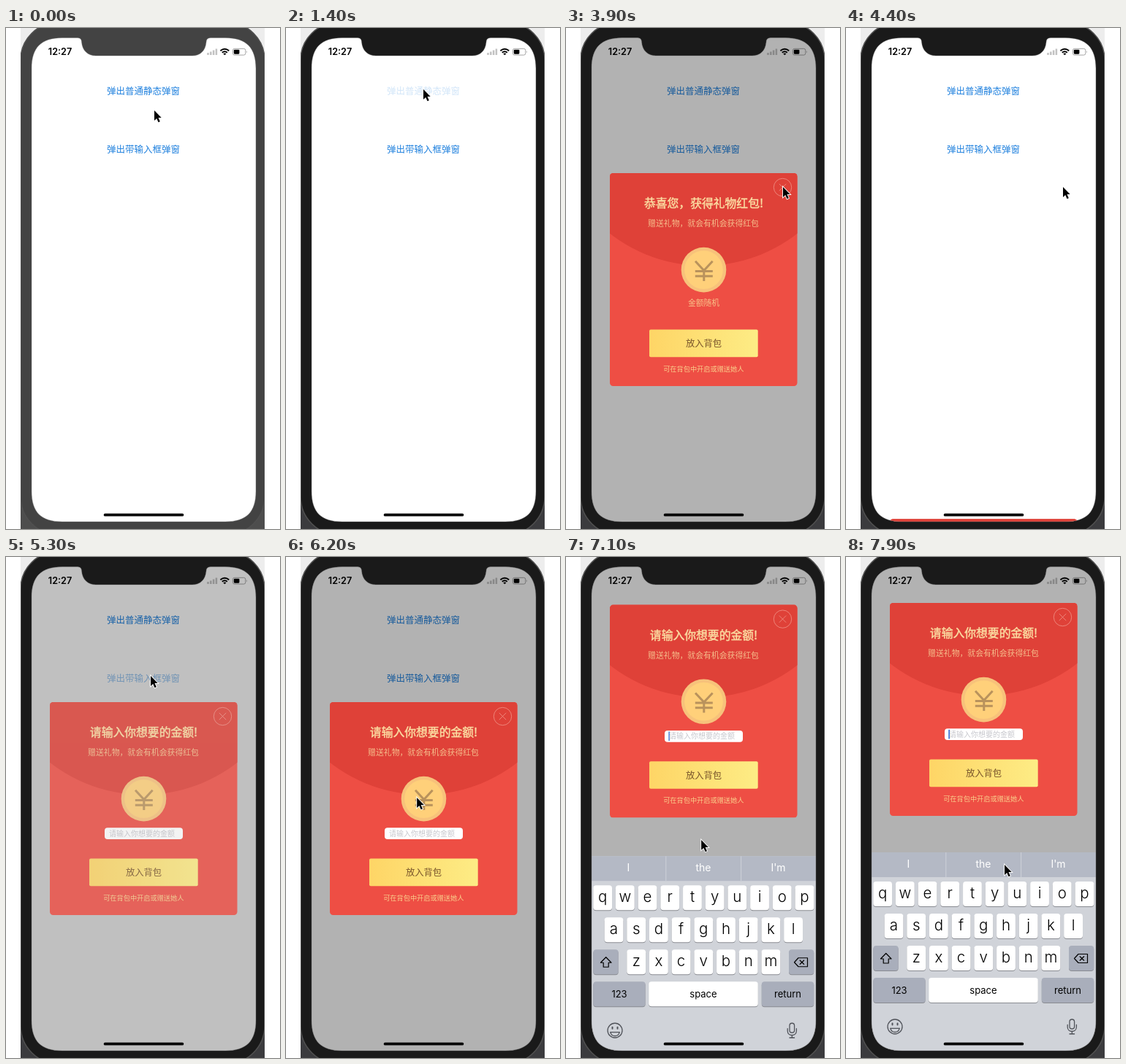
An HTML page that plays this animation: 375 px wide and 687 px high, repeating every 8 s.

```html
<!DOCTYPE html>
<html lang="zh-CN">
<head>
<meta charset="utf-8">
<title>弹窗</title>
<style>
  html, body { margin: 0; width: 100%; height: 100%; overflow: hidden; background: #fff; }
  svg { display: block; width: 375px; height: 687px; }
  text { font-family: "Noto Sans CJK SC", "Noto Sans CJK", "Noto Sans CJK JP", sans-serif; text-anchor: middle; }
  .latin { font-family: Inter, Roboto, sans-serif; }
</style>
</head>
<body>
<svg viewBox="0 0 375 687" xmlns="http://www.w3.org/2000/svg">
  <defs>
    <path id="outline" d="M77 13.5H98Q103.5 13.5 103.5 19.5C104.5 31 112 38 123 38H255C266 38 273 31 274 19.5Q274 13.5 280 13.5H300C329 13.5 342 27 342 55.5V635C342 664 329 677 300 677H77C48 677 35 664 35 635V55.5C35 27 48 13.5 77 13.5Z"/>
    <clipPath id="display"><use href="#outline"/></clipPath>
    <clipPath id="stage"><path d="M20 0H354V687H20Z"/></clipPath>
    <clipPath id="card"><rect x="60" y="199" width="256.5" height="292" rx="4.5"/></clipPath>
    <linearGradient id="gold"><stop stop-color="#fed566"/><stop offset="1" stop-color="#fdec85"/></linearGradient>
  </defs>

  <g clip-path="url(#stage)">
    <path d="M20 0H354V60H20Z" fill="#ededed"/>
    <path id="desk" d="M20 630H354V687H20Z"/>
    <rect id="bezel" x="20" y="-8" width="334" height="703" rx="52" stroke="#505050" stroke-width="1.6"/>
  </g>

  <g clip-path="url(#display)">
    <path d="M35 13H342V677H35Z" fill="#fff"/>
    <text class="latin" x="74" y="37" font-size="12.6" font-weight="600">12:27</text>
    <path d="M276.5 37V34M280.3 37V32.5M284.1 37V30.5M287.9 37V28.5" stroke="#c2c2c2" stroke-width="2.5"/>
    <path d="M293.4 31.2Q299.3 26.2 305.2 31.2M295.8 33.7Q299.3 30.8 302.8 33.7" fill="none" stroke="#000" stroke-width="2"/>
    <path d="M297.2 35.2Q299.3 33.6 301.4 35.2L299.3 37.3Z"/>
    <rect x="310.4" y="28.3" width="17.4" height="8.8" rx="2.4" fill="none" stroke="#9a9a9a" stroke-width=".9"/>
    <rect x="311.8" y="29.7" width="7.6" height="6" rx="1.1"/>
    <path d="M329 31.2Q330.6 32.7 329 34.2Z" fill="#9a9a9a"/>
    <g font-size="12.5" fill="#1f80de">
      <text id="plainButton" x="188" y="91">弹出普通静态弹窗</text>
      <text id="inputButton" x="188" y="171">弹出带输入框弹窗</text>
    </g>
    <path id="dim" d="M35 13H342V677H35Z"/>

    <g id="popup">
      <g clip-path="url(#card)">
        <path d="M60 199H317V491H60Z" fill="#ee4e44"/>
        <circle cx="188.3" cy="118" r="208" fill="#df4138"/>
      </g>
      <g fill="none" stroke="#f0958a" stroke-width=".8">
        <circle cx="296.5" cy="218.5" r="12.2"/>
        <path d="M291.8 213.8L301.2 223.2M301.2 213.8L291.8 223.2"/>
      </g>
      <text id="title" x="188.5" y="246" font-size="15.8" fill="#fbdda2" stroke="#fbdda2" stroke-width=".45"></text>
      <text x="188" y="272" font-size="10.85" fill="#f5bd8b">赠送礼物，就会有机会获得红包</text>
      <circle cx="188.5" cy="331.6" r="30.8" fill="#f7c27b"/>
      <circle cx="188.5" cy="331.6" r="26.3" fill="#ffd07a"/>
      <path d="M177 319.8L188.8 332.5L200.6 319.8M188.8 332V347M176.8 333.5H200.8M176.8 340.2H200.8" fill="none" stroke="#b9925c" stroke-width="3"/>
      <text id="amount" x="188.5" y="381" font-size="10.8" fill="#f8c389">金额随机</text>
      <g id="field">
        <rect x="135" y="371.3" width="107" height="15.8" rx="4" fill="#fff"/>
        <text x="186" y="382.6" font-size="10" fill="#c7c7cd">请输入你想要的金额</text>
        <rect id="caret" x="140.3" y="372.8" width="1.7" height="12.6" fill="#3b6fd4"/>
      </g>
      <rect x="114" y="413.6" width="148.7" height="37.6" rx="2" fill="url(#gold)"/>
      <text x="188.5" y="437" font-size="12.3" fill="#76522a">放入背包</text>
      <text x="188.3" y="470.7" font-size="9.2" fill="#fad08c">可在背包中开启或赠送她人</text>
    </g>

    <g id="keyboard"></g>
    <rect x="133.7" y="665.8" width="109.6" height="3.8" rx="1.9"/>
  </g>
  <use href="#outline" fill="none" stroke="#777" stroke-opacity=".5" stroke-width=".8"/>

  <path id="pointer" d="M0 0V13.9L3.2 11L5.5 16.2L7.8 15.2L5.5 10.1H9.7Z" stroke="#fff" stroke-width="1.8" paint-order="stroke"/>
</svg>

<script>
const $ = id => document.getElementById(id);
const LOOP = 8000, STEP = 100, GREY = '#a9aebb';

const label = (x, y, size, text, extra = '') =>
  `<text class="latin" x="${x}" y="${y}" font-size="${size}" ${extra}>${text}</text>`;
const cap = (x, y, w, fill = '#fff') =>
  [['#898b91', 1.1], [fill, 0]].map(([color, dy]) =>
    `<rect x="${x}" y="${y + dy}" width="${w}" height="34" rx="4" fill="${color}"/>`).join('');
const wordKey = (x, w, word, fill) => cap(x, 577, w, fill) + label(x + w / 2, 598.7, 13, word);
const suggestion = (x, word) => label(x, 425.5, 14,
  [...word].map((c, i) => `<tspan class="letter" data-i="${i}">${c}</tspan>`).join(''), 'fill="#fff"');

// Each row is centred on the keyboard.
const letterKeys = ['qwertyuiop', 'asdfghjkl', 'zxcvbnm'].map((row, r) =>
  [...row].map((c, i) => {
    const x = 188.3 + (i - (row.length - 1) / 2) * 30.7, y = 445 + r * 44;
    return cap(x - 12.9, y, 25.8) + label(x, y + 23.2, 20.5, c, 'font-weight="300"');
  }).join('')).join('');

$('keyboard').innerHTML = `
  <path d="M35 405H342V678H35Z" fill="#d0d3d9"/>
  <path d="M35 405H342V439H35Z" fill="#b4b9c5"/>
  <path d="M136.8 405V439M239.6 405V439" stroke="#cdd1d9"/>
  ${label(76, 425.5, 14, '“12”', 'id="oldWord" fill="#fff"')}
  ${suggestion(85.5, 'I')}${suggestion(188, 'the')}${suggestion(290.5, "I'm")}
  ${letterKeys}
  ${cap(37.4, 533, 34.2, GREY)}${cap(305, 533, 34.2, GREY)}
  ${wordKey(37.4, 71.2, '123', GREY)}${wordKey(113.2, 149.6, 'space')}${wordKey(267.8, 71.4, 'return', GREY)}
  <g fill="none" stroke="#000" stroke-width="1.2" stroke-linejoin="round">
    <path d="M54.7 543.5L62 551H58.2V557H51.2V551H47.4Z"/>
    <path d="M318 544.5H330.5V556.5H318L312.5 550.5ZM319.8 547.5L326 553.5M326 547.5L319.8 553.5"/>
  </g>
  <g fill="none" stroke="#50535a" stroke-width="1.3" stroke-linecap="round">
    <circle cx="67" cy="644" r="10"/>
    <path d="M60.8 646.3H73.2Q72 651.5 67 651.5Q62 651.5 60.8 646.3Z"/>
    <path d="M63.5 639.5V641.5M70.5 639.5V641.5" stroke-width="2"/>
    <rect x="306" y="634" width="6.6" height="13" rx="3.3"/>
    <path d="M303.2 641.5V644.5C303.2 652.5 315.4 652.5 315.4 644.5V641.5M309.3 650.7V654M306 654H312.6"/>
  </g>`;

const clamp = v => Math.min(1, Math.max(0, v));
const ramp = (t, start, length) => clamp((t - start) / length);
const smooth = k => k * k * (3 - 2 * k);
// Critically damped spring used by the keyboard.
const spring = ms => {
  const x = Math.max(0, ms) * .01826;
  return 1 - (1 + x) * Math.exp(-x);
};
const pressed = (t, down, up) => 1 - .8 * ramp(t, down, 100) * (1 - ramp(t, up, 300));
const fade = (id, value) => $(id).setAttribute('opacity', value);
const move = (id, x, y) => $(id).setAttribute('transform', `translate(${x} ${y})`);
const letters = document.querySelectorAll('.letter');

const pointerMoves = [
  { start: 100, end: 500, x: 188, y: 84 },
  { start: 1900, end: 2300, x: 266, y: 117 },
  { start: 2300, end: 2800, x: 297, y: 218 },
  { start: 4450, end: 4900, x: 198, y: 163 },
  { start: 5500, end: 6500, x: 174, y: 376 },
  { start: 6900, end: 7500, x: 217, y: 422 }
];

function pointerAt(t) {
  let x = 203, y = 113;
  for (const m of pointerMoves) {
    const k = smooth(ramp(t, m.start, m.end - m.start));
    x += (m.x - x) * k;
    y += (m.y - y) * k;
  }
  return [x, y];
}

function draw(t) {
  const focused = t >= 1300, second = t >= 4600;
  const shown = ramp(t, second ? 5126 : 1426, 212);
  const closing = second ? 0 : ramp(t, 4060, 440);
  const rise = spring(t - 6778);

  $('bezel').setAttribute('fill', focused ? '#1a1a1a' : '#434343');
  $('desk').setAttribute('fill', focused ? '#3b3b3e' : '#4d4d4d');
  move('pointer', ...pointerAt(t));
  fade('plainButton', pressed(t, 1300, 1450));
  fade('inputButton', pressed(t, 5100, 5200));

  fade('dim', .3 * shown * (1 - clamp(closing * 1.3)));
  fade('popup', shown);
  move('popup', 0, 663 * closing ** 1.3 - 136 * rise);
  $('title').textContent = second ? '请输入你想要的金额!' : '恭喜您，获得礼物红包!';
  fade('amount', second ? 0 : 1);
  fade('field', second ? 1 : 0);
  fade('caret', t < 6700 ? 0 : clamp(.5 + Math.cos((t - 6900) / 1000 * 2 * Math.PI)));

  move('keyboard', 0, 273 * (1 - rise));
  fade('oldWord', .35 * (1 - ramp(t, 6900, 150)));
  letters.forEach(el => el.setAttribute('fill-opacity', ramp(t, 6750 + el.dataset.i * 50, 100)));
}

const start = performance.now();
function tick() {
  const t = (performance.now() - start) % LOOP;
  draw(Math.floor(t / STEP) * STEP);
  requestAnimationFrame(tick);
}
tick();
</script>
</body>
</html>
```
